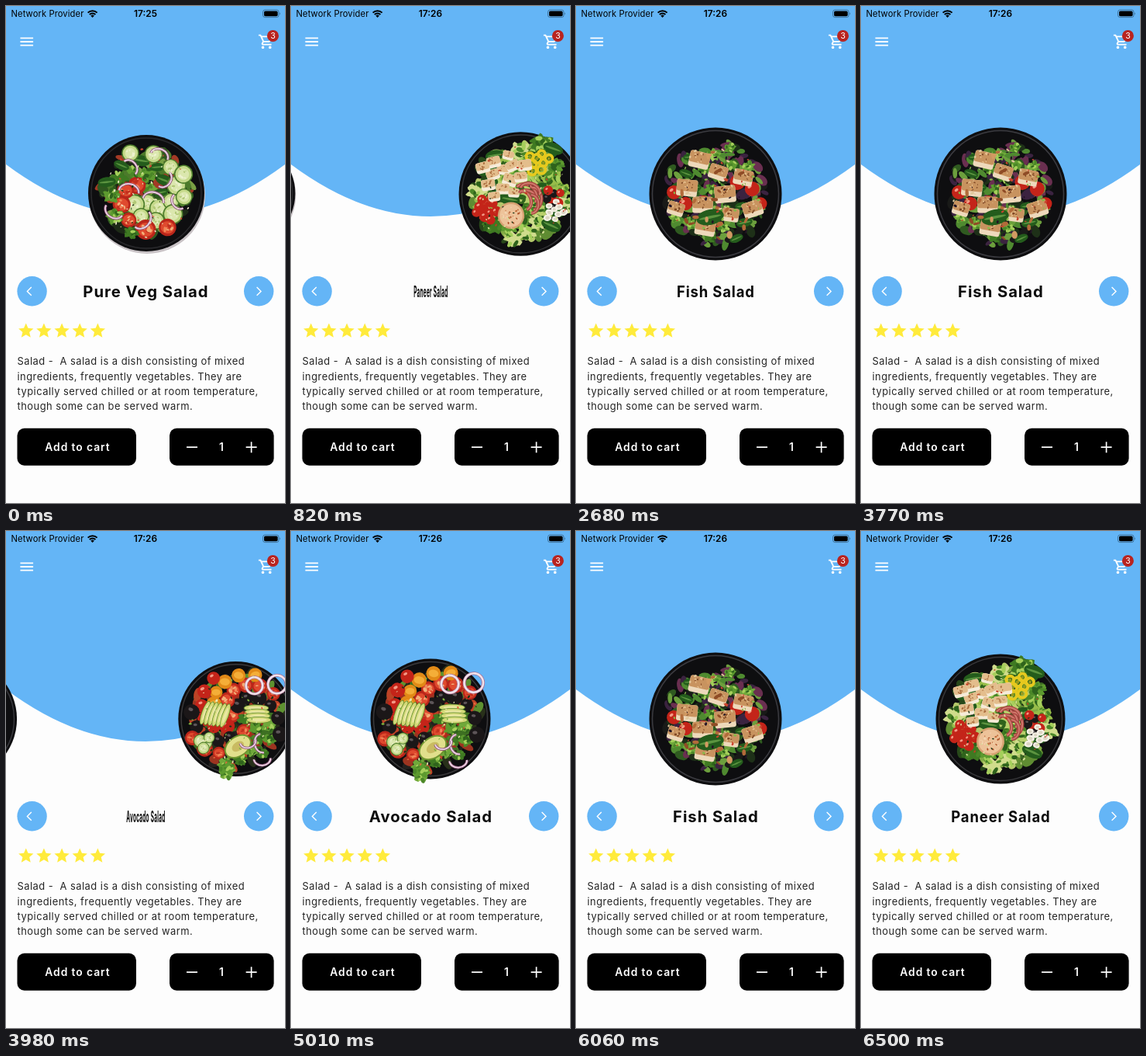
Animation, 360 px wide and 640 px high, one loop 8000 ms. Source, as an HTML page:

```html
<!DOCTYPE html>
<html lang="en">
<head>
<meta charset="utf-8">
<title>Salad shop</title>
<style>
  html, body { margin: 0; width: 100%; height: 100%; overflow: hidden; background: #fdfdfd; }
  svg { display: block; width: 100vw; height: 100vh; font-family: Inter, "Open Sans", sans-serif; }
  text { white-space: pre; }
  .title { font-size: 20.3px; font-weight: 700; letter-spacing: .93px; text-anchor: middle; fill: #0b0b0b; }
  .body { font-size: 12.92px; letter-spacing: .48px; fill: #242424; }
  .button { font-size: 13.85px; font-weight: 600; letter-spacing: .92px; fill: #fff; }
  .status { font-size: 11.2px; letter-spacing: .1px; }
  .clock { font-size: 11.9px; font-weight: 600; text-anchor: middle; }
  .line { fill: none; stroke: #fff; stroke-width: 1.7; }
</style>
</head>
<body>
<svg viewBox="0 0 360 640">
  <rect width="360" height="640" fill="#fdfdfd"/>
  <path d="M0 0V204Q180 338 360 204V0z" fill="#64b5f6"/>
  <g id="dishes"></g>

  <text class="status" x="6.5" y="14">Network Provider</text>
  <g fill="none" stroke="#000" stroke-width="2">
    <path d="M105.6 8.6a8.6 8.6 0 0 1 12 0M107.8 11a5.4 5.4 0 0 1 7.6 0"/>
    <path d="M111.6 15l-2.3-2.4a3.3 3.3 0 0 1 4.6 0z" fill="#000" stroke="none"/>
  </g>
  <text class="clock" id="clock" x="180" y="14"></text>
  <rect x="331.5" y="5" width="20.5" height="9.6" rx="2.8" fill="none" stroke="#000" stroke-opacity=".4" stroke-width=".9"/>
  <rect x="333" y="6.4" width="17.6" height="6.8" rx="1.6"/>
  <path d="M353.2 8.2q1.5 1.6 0 3.2z" fill-opacity=".5"/>

  <g fill="#fff">
    <path transform="translate(15.7 34.9) scale(.923)" d="M3 18h18v-2H3v2zm0-5h18v-2H3v2zm0-7v2h18V6H3z"/>
    <path transform="translate(325 34.8) scale(.923)" d="M15.55 13c.75 0 1.41-.41 1.75-1.03l3.58-6.49c.37-.66-.11-1.48-.87-1.48H5.21l-.94-2H1v2h2l3.6 7.59-1.35 2.44C4.52 15.37 5.48 17 7 17h12v-2H7l1.1-2h7.45zM6.16 6h12.15l-2.76 5H8.53L6.16 6zM7 18a2 2 0 1 0 0 4 2 2 0 0 0 0-4zm10 0a2 2 0 1 0 0 4 2 2 0 0 0 0-4z"/>
  </g>
  <circle cx="344.4" cy="38.4" r="7.5" fill="#b9231f"/>
  <text x="344.4" y="42.2" font-size="10.6" text-anchor="middle" fill="#fff">3</text>

  <g fill="#64b5f6">
    <circle cx="33.6" cy="367.3" r="19.2"/>
    <circle cx="326.2" cy="367.3" r="19.2"/>
  </g>
  <path class="line" style="stroke-width:1.4" d="M32.8 362l-5.4 5.4 5.4 5.4M323.6 362l5.4 5.4-5.4 5.4"/>
  <text class="title" id="title"></text>
  <g id="stars" fill="#ffeb3b"></g>
  <g class="body" id="about"></g>

  <rect x="14.5" y="543.8" width="153.5" height="47.9" rx="9.2"/>
  <rect x="211" y="543.8" width="134.6" height="47.9" rx="9.2"/>
  <text class="button" x="50.3" y="573.3">Add to cart</text>
  <text class="button" x="278.4" y="573.3" text-anchor="middle">1</text>
  <path class="line" d="M233 568.2h14M309.6 568.2h14M316.6 561.2v14"/>
</svg>
<script>
const $ = id => document.getElementById(id);
const clamp = v => Math.max(0, Math.min(1, v));

function seeded(seed) {
  return () => {
    seed = (seed + 0x6D2B79F5) | 0;
    let v = Math.imul(seed ^ (seed >>> 15), 1 | seed);
    v = (v + Math.imul(v ^ (v >>> 7), 61 | v)) ^ v;
    return ((v ^ (v >>> 14)) >>> 0) / 4294967296;
  };
}

let rnd;
const pick = list => list[Math.floor(rnd() * list.length)];
const disc = (r, fill, more = '') => `<circle r="${r}" fill="${fill}" ${more}/>`;
const hoop = (r, color, width) => disc(r, 'none', `stroke="${color}" stroke-width="${width}"`);
const at = (x, y, turn, inner) =>
  `<g transform="translate(${x.toFixed(1)} ${y.toFixed(1)}) rotate(${turn.toFixed(0)})">${inner}</g>`;
const oval = (rx, ry, fill) => `<ellipse rx="${rx.toFixed(1)}" ry="${ry.toFixed(1)}" fill="${fill}"/>`;

// Random ovals spread evenly over a disc.
function scatter(n, radius, size, colors) {
  let out = '';
  for (let i = 0; i < n; i++) {
    const a = rnd() * Math.PI * 2, d = Math.sqrt(rnd()) * radius, s = size * (.6 + rnd() * .7);
    out += at(d * Math.cos(a), d * Math.sin(a), rnd() * 180, oval(s, s * (.35 + rnd() * .4), pick(colors)));
  }
  return out;
}

// A spiral of pieces, taking the named kinds in turn.
function mix(kinds, n, size, spread, x = 0, y = 0) {
  const names = kinds.split(' '), phase = rnd() * 6;
  let out = '';
  for (let i = 0; i < n; i++) {
    const a = phase + i * 2.4, d = spread * Math.sqrt((i + .5) / n), s = size * (.85 + rnd() * .3);
    out += at(x + d * Math.cos(a), y + d * Math.sin(a), rnd() * 50 - 25, pieces[names[i % names.length]](s));
  }
  return out;
}

function leaf(r, fill) {
  const phase = rnd() * 6, pts = [];
  for (let a = 0; a < 6.28; a += .21) {
    const d = r * (.86 + .16 * Math.sin(5 * a + phase) + .1 * Math.sin(9 * a));
    pts.push((d * Math.cos(a)).toFixed(1) + ',' + (d * .8 * Math.sin(a)).toFixed(1));
  }
  return `<polygon points="${pts.join(' ')}" fill="${fill}"/>` + scatter(7, r * .7, r * .3, ['#a5cf5b', '#4b8728', '#2f631c']);
}

function block(r, side, top, speck) {
  const h = r * .8;
  return `<rect x="${-r}" y="${-h}" width="${2 * r}" height="${2 * h}" rx="3" fill="${side}"/>` +
    `<rect x="${-r}" y="${-h}" width="${2 * r}" height="${1.4 * h}" rx="3" fill="${top}"/>` +
    at(0, -h * .3, 0, scatter(12, h * .7, 1.4, [speck, '#e5be8d']));
}

const arc = (r, color, width) =>
  `<path d="M${-r} 0A${r} ${r * .8} 0 0 1 ${r} 0" fill="none" stroke="${color}" stroke-width="${width}"/>`;

const pieces = {
  leaf: r => leaf(r, pick(['#3f7a22', '#5d9a2f', '#6fa83a'])),
  lettuce: r => leaf(r, pick(['#b9d06c', '#98bd4a', '#d0dc8c'])),
  spinach: r => oval(r, r * .55, '#245c1c') + oval(r * .8, r * .1, '#5c9440'),
  cucumber: r => disc(r, '#4d7d2b') + disc(r * .87, '#c5d98a') + disc(r * .6, '#dbe7ae') +
    scatter(7, r * .5, r * .16, ['#b2c877', '#edf2cf']),
  tomato: r => disc(r, '#b9261a') + oval(r * .78, r * .7, '#df4a2e') +
    scatter(6, r * .5, r * .25, ['#f0885a', '#c2301f', '#f3b07a']),
  cherry: r => disc(r, '#c42419') + at(-r * .3, -r * .35, -30, oval(r * .3, r * .2, '#f39a86')),
  gold: r => disc(r, '#e28a17') + oval(r * .7, r * .5, '#f4ae38'),
  olive: r => disc(r, '#1b1718') + at(-r * .2, -r * .3, 0, oval(r * .3, r * .2, '#5d5558')),
  onion: r => at(0, 0, rnd() * 360, arc(r, '#8d4f78', 3.4) + arc(r, '#ead5e2', 1.8)),
  pickled: r => at(0, 0, rnd() * 180, arc(r, '#a8433f', 4.5) + arc(r, '#cf7a6c', 2)),
  ring: r => hoop(r, '#a86a92', 4) + hoop(r, '#f1e3ea', 2.6),
  cube: r => block(r, '#f6ebd8', '#e3bd8c', '#a8693a'),
  fillet: r => block(r, '#eed9bb', '#c8935f', '#7d4624'),
  pepper: r => hoop(r, '#e6c91e', 4) + disc(r * .4, '#9a9a1e'),
  feta: r => oval(r, r * .8, '#f5f1e6') + oval(r * .5, r * .4, '#dcd6c4')
};

const plate = (r, rim) => disc(r, '#0e0e10') + hoop(r - 4, rim, 1.5);

function vegDish() {
  return at(2, 2, 0, disc(75, '#c9c3c6')) + at(1, -1, 0, plate(75, '#29292c') +
    scatter(130, 58, 9, ['#2f571f', '#4c7a2b', '#79a044', '#1d2a17', '#a33a25']) +
    mix('leaf cucumber tomato spinach cucumber', 32, 11.5, 56) +
    mix('onion', 8, 12, 52) +
    scatter(60, 58, 1.5, ['#f1eacb', '#e4e7b8', '#203b16', '#cf4630']));
}

function paneerDish() {
  return plate(83.5, '#37373a') +
    scatter(170, 66, 9, ['#3d6b23', '#5f8c32', '#83ab45', '#28481a', '#b4c76a']) +
    mix('leaf lettuce spinach lettuce', 36, 14, 64) +
    mix('leaf spinach', 5, 16, 14, 32, -62) +
    mix('pepper', 8, 5, 16, 24, -44) +
    mix('cherry', 11, 6.5, 17, -46, 19) +
    mix('cherry olive', 7, 6, 14, 45, 6) +
    mix('cube', 13, 8.5, 33, -23, -26) +
    mix('pickled', 6, 14, 10, 10, 5) +
    mix('feta', 9, 5, 14, 46, 24) +
    at(-13, 29, 0, disc(18, '#d7a172') + disc(15.5, '#edc299') + scatter(32, 13, 1.3, ['#c06a38', '#a94a22', '#f5d9b7'])) +
    scatter(60, 64, 1.6, ['#d6df9a', '#20391a', '#c43b22']);
}

function fishDish() {
  return plate(85.5, '#3b3b40') +
    scatter(220, 66, 8, ['#2f5a20', '#4f8a30', '#1e3018', '#3b2340', '#6a2f50', '#6c9f3d', '#191a18']) +
    mix('leaf spinach cherry leaf', 26, 9.5, 64) +
    mix('fillet', 10, 12, 56) +
    at(-7, 30, -12, pieces.spinach(18)) +
    scatter(24, 58, 4, ['#b26b3a', '#8f4c26', '#d29a62']) +
    scatter(60, 64, 2, ['#8ab84a', '#231426', '#c9452f', '#e0c79b']);
}

function avocadoFan(n) {
  let out = '';
  for (let i = 0; i < n; i++) {
    out += at((i - n / 2) * 5.5, 0, 12, oval(4.6, 17, '#5e8a2c') + oval(3.8, 16, '#d3d978') + oval(1.9, 11, '#e9e7a2'));
  }
  return out;
}

function avocadoDish() {
  return plate(77.5, '#3a393b') +
    scatter(150, 64, 9, ['#3d6f22', '#5e9130', '#9c3420', '#28301a', '#bd4326', '#22201e']) +
    mix('tomato leaf cherry olive tomato gold leaf olive', 46, 9.5, 65) +
    mix('cucumber', 4, 8, 10, -42, 30) +
    mix('leaf', 2, 11, 4, -11, 70) +
    at(-25, -6, 8, avocadoFan(6)) + at(30, -4, 78, avocadoFan(4)) +
    at(3, 37, -35, oval(20, 14, '#6f952f') + oval(18, 12, '#e1df8c') + oval(9, 6, '#c9bb62')) +
    mix('ring', 2, 11, 24, 36, -40) + mix('onion', 3, 12, 20, 32, 40) +
    scatter(50, 64, 1.7, ['#e8e6b0', '#1f3315', '#e06a3c', '#7cb23e']);
}

const dishes = [
  ['Pure Veg Salad', vegDish], ['Paneer Salad', paneerDish],
  ['Fish Salad', fishDish], ['Avocado Salad', avocadoDish]
].map(([name, draw], i) => {
  rnd = seeded(41 + i * 17);
  const node = document.createElementNS('http://www.w3.org/2000/svg', 'g');
  node.innerHTML = draw();
  $('dishes').append(node);
  return { name, node };
});

const star = 'M12 17.27L18.18 21l-1.64-7.03L22 9.24l-7.19-.61L12 2 9.19 8.63 2 9.24l5.46 4.73L5.82 21z';
$('stars').innerHTML = [...Array(5).keys()].map(i =>
  `<path transform="translate(${14.2 + i * 23.15} 406.5) scale(.965)" d="${star}"/>`).join('');

$('about').innerHTML = [
  'Salad -  A salad is a dish consisting of mixed',
  'ingredients, frequently vegetables. They are',
  'typically served chilled or at room temperature,',
  'though some can be served warm.'
].map((line, i) => `<text x="14.5" y="${462.4 + i * 19.3}">${line}</text>`).join('');

const LOOP = 8000, PAGE = 360, STEP = 110;
const taps = [590, 2230, 3770, 5010, 6060];
// Forward to the last dish, then back.
const pageAfter = count => 3 - Math.abs(3 - count);

function render(t) {
  const count = taps.filter(tap => tap <= t).length;
  const from = pageAfter(Math.max(0, count - 1)), to = pageAfter(count);
  // The screen refreshes four times after a tap, then rests.
  const tick = count ? Math.min(4, Math.floor((t - taps[count - 1] + 10) / STEP)) : 0;
  const since = Math.max(0, tick * STEP - 10);
  const page = from + (to - from) * clamp((since - 7) / 300);

  dishes.forEach(({ node }, i) => {
    const off = i - page;
    node.style.display = Math.abs(off) < 1 ? '' : 'none';
    node.setAttribute('transform', `translate(${180 + off * PAGE} 242) scale(${1 - .135 * Math.abs(off)})`);
  });

  const grow = tick ? clamp((since - 93) / 370) : 1;
  $('title').textContent = dishes[tick ? to : from].name;
  $('title').setAttribute('transform', `translate(180.4 375.2) scale(${grow} 1)`);
  $('clock').textContent = t < 500 ? '17:25' : '17:26';
}

const start = performance.now();
function frame() {
  render((performance.now() - start) % LOOP);
  requestAnimationFrame(frame);
}
frame();
</script>
</body>
</html>
```
